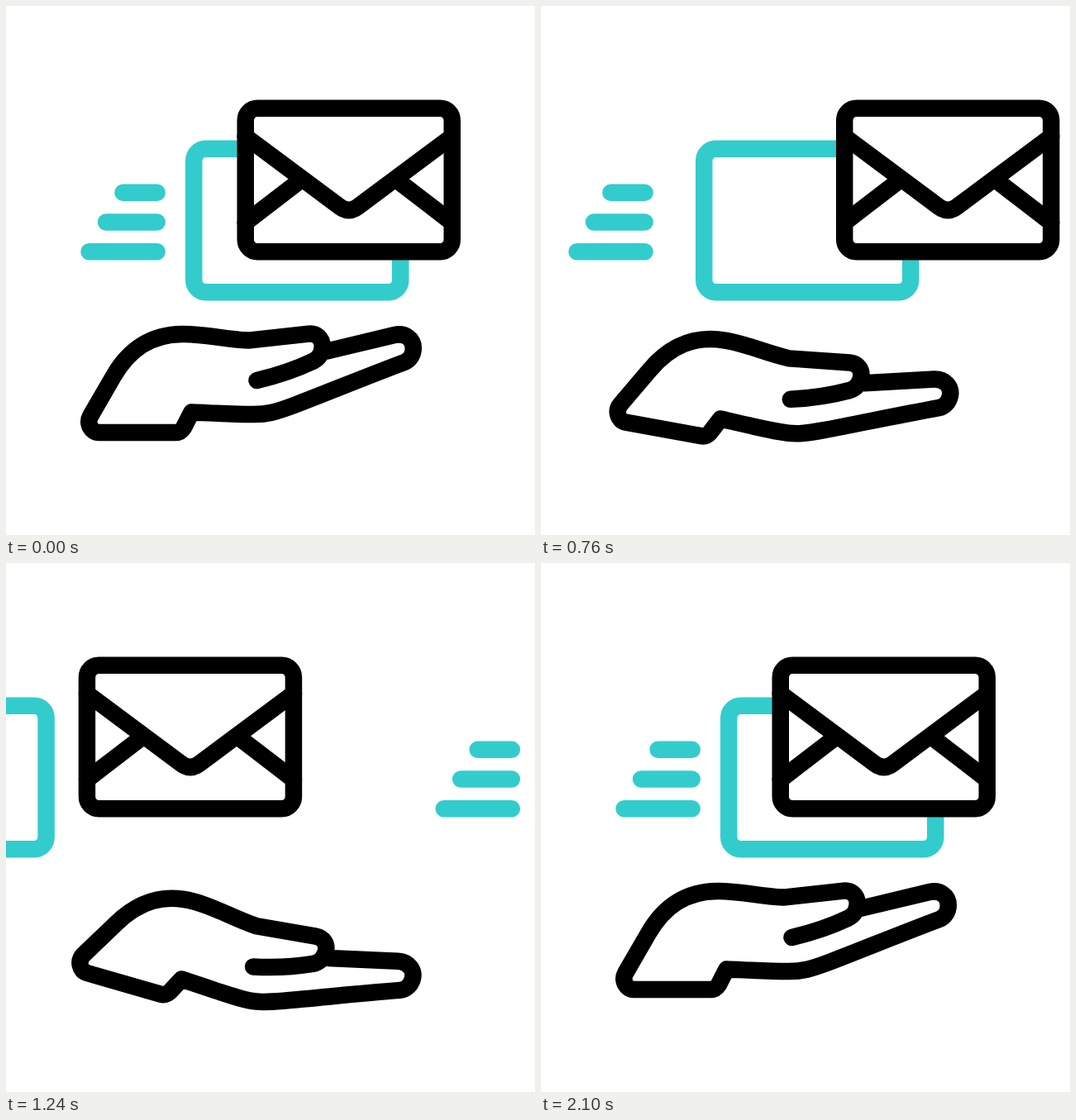
Animation, 640 px wide and 640 px high, one loop 2400 ms. Source, as an HTML page:

```html
<!DOCTYPE html>
<html lang="en">
<head>
<meta charset="utf-8">
<title>Mail delivery</title>
<style>
  html, body { margin: 0; width: 100%; height: 100%; overflow: hidden; background: #fff; }
  svg { display: block; width: 100vw; height: 100vh; }
  g { fill: none; stroke: #000; stroke-width: 20.5; stroke-linecap: round; stroke-linejoin: round; }
  .teal { stroke: #3cc; }
  .envelope rect { fill: #fff; }
</style>
</head>
<body>
<svg viewBox="0 0 640 640">
  <g id="lines" class="teal">
    <path d="M141.5 225.7H182.7M121 261.5H182.7M100.5 297.2H182.7"/>
  </g>
  <g id="card" class="teal">
    <rect x="227.25" y="172.75" width="250" height="173.5" rx="14.5"/>
  </g>
  <g id="envelope" class="envelope">
    <rect x="289.75" y="123.75" width="250" height="173.5" rx="14.5"/>
    <path d="M289.75 157.9L404 243Q414.75 251 425.5 243L539.75 157.9"/>
    <path d="M289.75 262L357 210.3M539.75 262L472.5 210.3"/>
  </g>
  <g id="hand">
    <path d="M303.5 453C327 447.5 352 439 372 429.5C379 426 382.7 419 382.7 411.5
      C382.7 402 375.5 395.6 366 396.6L293 404.6C262 403 240 396.5 213 397
      C175 397.5 149 415 130 448L102.5 495.5C97 505 103 516 112.5 516H205
      C210 516 212.5 514 215 510L224.5 491.5C250 492.5 275 494 298 494
      C316 494.3 326 491.5 350 482.5C394 465.5 438 447.5 482 431
      C488.5 428.5 492.8 421.5 492.8 414C492.8 403 483 395.2 470 398L388 417.6"/>
  </g>
</svg>
<script>
const LOOP = 2400, STEP = 20;

const both = u => u * u * (3 - 2 * u);
const speedUp = u => u * u * (2 - u);
const slowDown = u => u + u * u - u * u * u;

// Each key: time, value, easing used to arrive there.
const tracks = {
  envelope: [[0, 0], [580, -60.5, both], [980, 379, speedUp], [980, -574],
    [1490, 25.8, slowDown], [1725, 0, both]],
  card: [[100, 0], [680, -62.5, both], [1100, 432, speedUp], [1100, -588],
    [1725, 18, slowDown], [1910, 0, both]],
  lines: [[210, 0], [788, -57.5, both], [1340, 557, speedUp], [1340, -590],
    [1930, 20, slowDown], [2100, 0, both]],
  hand: [[0, 0], [405, -6.2, both], [960, 17.25, both], [1180, 17.25, both],
    [1660, -9.2, both], [2100, 0, both]]
};

function valueAt(keys, t) {
  const next = keys.findIndex(key => key[0] > t);
  if (next === 0) return keys[0][1];
  if (next < 0) return keys[keys.length - 1][1];
  const [t0, v0] = keys[next - 1];
  const [t1, v1, ease] = keys[next];
  return v0 + (v1 - v0) * ease((t - t0) / (t1 - t0));
}

const parts = Object.entries(tracks).map(([id, keys]) => ({
  el: document.getElementById(id),
  keys,
  pose: id === "hand" ? v => `rotate(${v} 176 455)` : v => `translate(${v} 0)`
}));

const start = performance.now();

function draw(now) {
  const elapsed = Math.max(0, now - start) % LOOP;
  const t = Math.floor(elapsed / STEP) * STEP;
  for (const { el, keys, pose } of parts) {
    el.setAttribute("transform", pose(valueAt(keys, t)));
  }
  requestAnimationFrame(draw);
}
draw(start);
</script>
</body>
</html>
```
